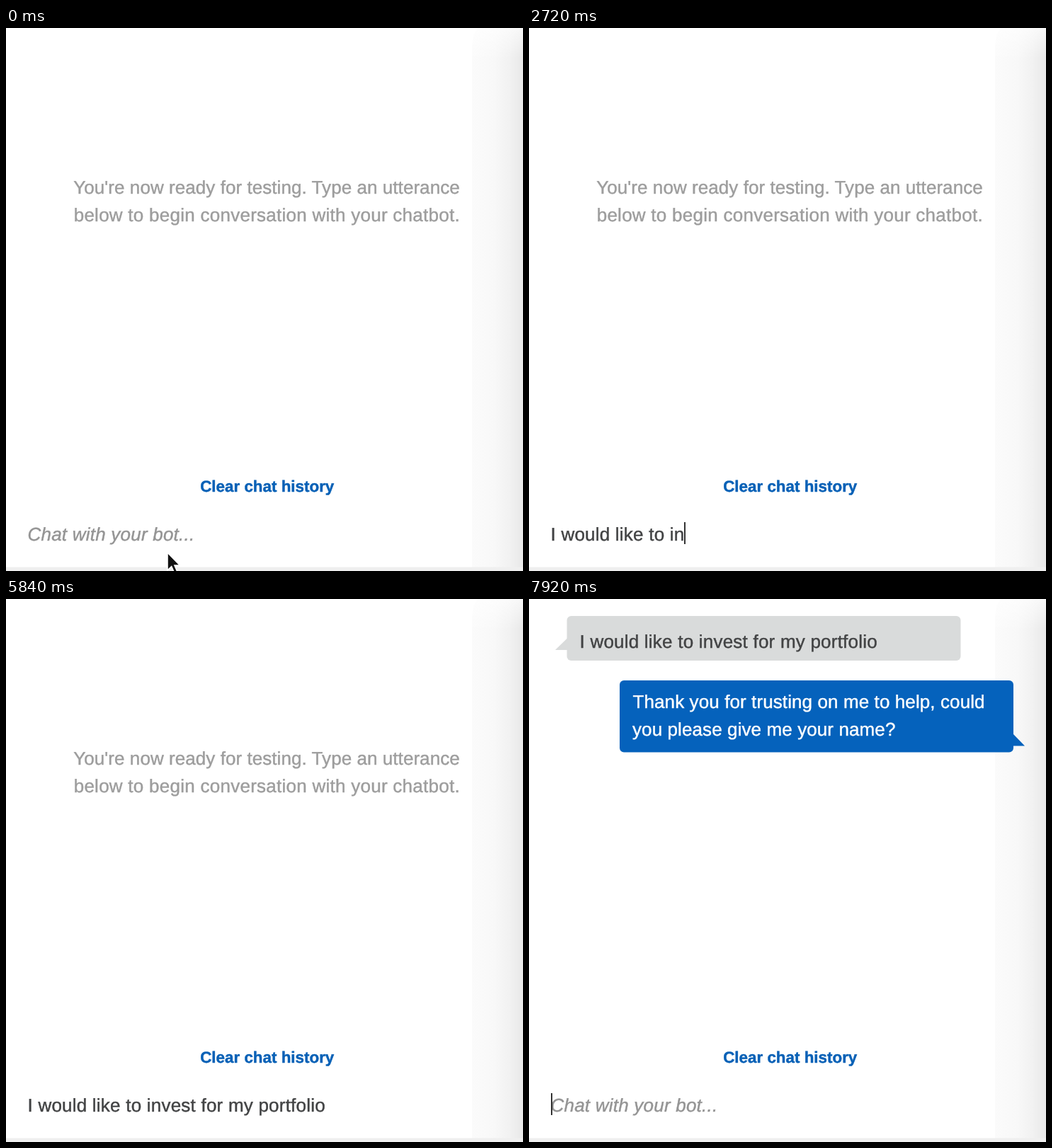
Write an HTML page that moves like this. It is 730 px wide and 767 px high and loops after 8000 ms.

```html
<!DOCTYPE html>
<html lang="en">
<head>
<meta charset="utf-8">
<title>Chat test</title>
<style>
  html, body { margin: 0; width: 100%; height: 100%; overflow: hidden; background: #fff; }
  svg { display: block; width: 100%; height: 100%; }
  text {
    font: 26px "Liberation Sans", Arial, Helvetica, sans-serif;
    letter-spacing: .22px;
    white-space: pre;
    text-rendering: geometricPrecision;
    stroke-width: .45px;
  }
  .greeting { fill: #9d9d9d; stroke: #9d9d9d; text-anchor: middle; }
  .dark { fill: #424344; stroke: #424344; }
  .light { fill: #fff; stroke: #fff; letter-spacing: .1px; }
  .hint { fill: #949494; stroke: #949494; font-style: italic; }
  .link { fill: #0760b6; stroke: #0760b6; font-size: 22.4px; font-weight: bold; letter-spacing: 0; }
</style>
</head>
<body>
<svg viewBox="0 0 730 767" preserveAspectRatio="none">
  <defs>
    <linearGradient id="shade">
      <stop offset="0" stop-color="#fbfbfb"/>
      <stop offset=".45" stop-color="#f8f8f8"/>
      <stop offset=".75" stop-color="#f1f1f1"/>
      <stop offset="1" stop-color="#e8e8e8"/>
    </linearGradient>
    <linearGradient id="fade" x1=".35" y1="0" x2=".5" y2="1">
      <stop offset="0" stop-color="#fff" stop-opacity=".7"/>
      <stop offset="1" stop-color="#fff" stop-opacity="0"/>
    </linearGradient>
  </defs>

  <rect width="730" height="767" fill="#fff"/>
  <path d="M658 767V30Q658 8 666 0H730V767Z" fill="url(#shade)"/>
  <rect x="658" width="72" height="45" fill="url(#fade)"/>
  <rect y="761.5" width="730" height="6" fill="#efefef"/>

  <g id="greeting">
    <text class="greeting" x="368" y="233.5" style="letter-spacing:.06px">You're now ready for testing. Type an utterance</text>
    <text class="greeting" x="368.3" y="272.5" style="letter-spacing:.26px">below to begin conversation with your chatbot.</text>
  </g>

  <g id="question">
    <rect x="53.5" y="24" width="556" height="63" rx="6" fill="#d9dbdb"/>
    <path d="M37 72L54 55.5V72Z" fill="#d9dbdb"/>
    <text id="sent" class="dark" x="71.5" y="68.5"></text>
  </g>

  <g id="reply">
    <rect x="128" y="115" width="556" height="101.5" rx="6" fill="#0562bc"/>
    <path d="M683.5 190.500L700 207.500H683.500Z" fill="#0562bc"/>
    <text class="light" x="146.5" y="154">Thank you for trusting on me to help, could</text>
    <text class="light" x="146" y="193">you please give me your name?</text>
  </g>

  <text class="link" x="274.2" y="655">Clear chat history</text>
  <text id="hint" class="hint" x="30.5" y="723.5">Chat with your bot...</text>
  <text id="input" class="dark" x="30.5" y="723.5"></text>
  <rect id="caret" y="698" width="2" height="31" fill="#333"/>
  <path id="pointer" d="M0 0V25L5.7 19.600L10 29.500L14.200 27.700L10 18H17.500Z"
        fill="#111" stroke="#fff" stroke-width="1.6"/>
</svg>
<script>
  const LOOP = 8000, STEP = 80;
  const FOCUS = 320, SEND = 6320, REPLY = 7600;
  const INPUT_X = 30.5;
  const BLINK = 640;

  // Each burst of input; the caret stays solid during it and blinks after it.
  const bursts = [
    { text: "", from: FOCUS, to: 400 },
    { text: "I would", from: 1200, to: 2160 },
    { text: " like to invest", from: 2160, to: 2920 },
    { text: " ", from: 3040, to: 3120 },
    { text: "for my po", from: 4160, to: 4880 },
    { text: "rt", from: 4880, to: 5200 },
    { text: "folio", from: 5360, to: 5600 },
    { text: "", from: SEND, to: 6640 }
  ];
  const message = bursts.map(b => b.text).join("");

  const el = {};
  for (const node of document.querySelectorAll("svg [id]")) el[node.id] = node;
  el.sent.textContent = message;

  const clamp = v => Math.max(0, Math.min(1, v));
  const show = (node, on) => node.setAttribute("visibility", on ? "visible" : "hidden");

  function typedText(t) {
    if (t >= SEND) return "";
    return bursts.map(({ text, from, to }) =>
      text.slice(0, Math.floor(text.length * clamp((t - from) / (to - from)) + 1e-6))).join("");
  }

  // Fades out after a short rest and back in at the end of each blink.
  function caretOpacity(t) {
    const last = bursts.filter(b => b.from <= t).pop();
    if (!last) return 0;
    const phase = Math.max(0, t - last.to) % BLINK;
    return clamp(Math.abs(phase - 360) / 160 - .75);
  }

  function draw(time) {
    const t = Math.floor(time % LOOP / STEP) * STEP;
    const typed = typedText(t);

    show(el.greeting, t < SEND);
    show(el.question, t >= SEND);
    show(el.reply, t >= REPLY);
    show(el.hint, !typed);

    el.input.textContent = typed;
    const width = typed ? el.input.getComputedTextLength() : 0;
    el.caret.setAttribute("x", Math.round(INPUT_X + width));
    el.caret.setAttribute("opacity", caretOpacity(t));

    // The pointer slides out below the stage.
    const drop = clamp(t / FOCUS);
    show(el.pointer, drop < 1);
    el.pointer.setAttribute("transform", `translate(228 ${741 + 30 * drop * drop})`);
  }

  const start = performance.now();
  function tick() {
    draw(performance.now() - start);
    requestAnimationFrame(tick);
  }
  tick();
</script>
</body>
</html>
```
